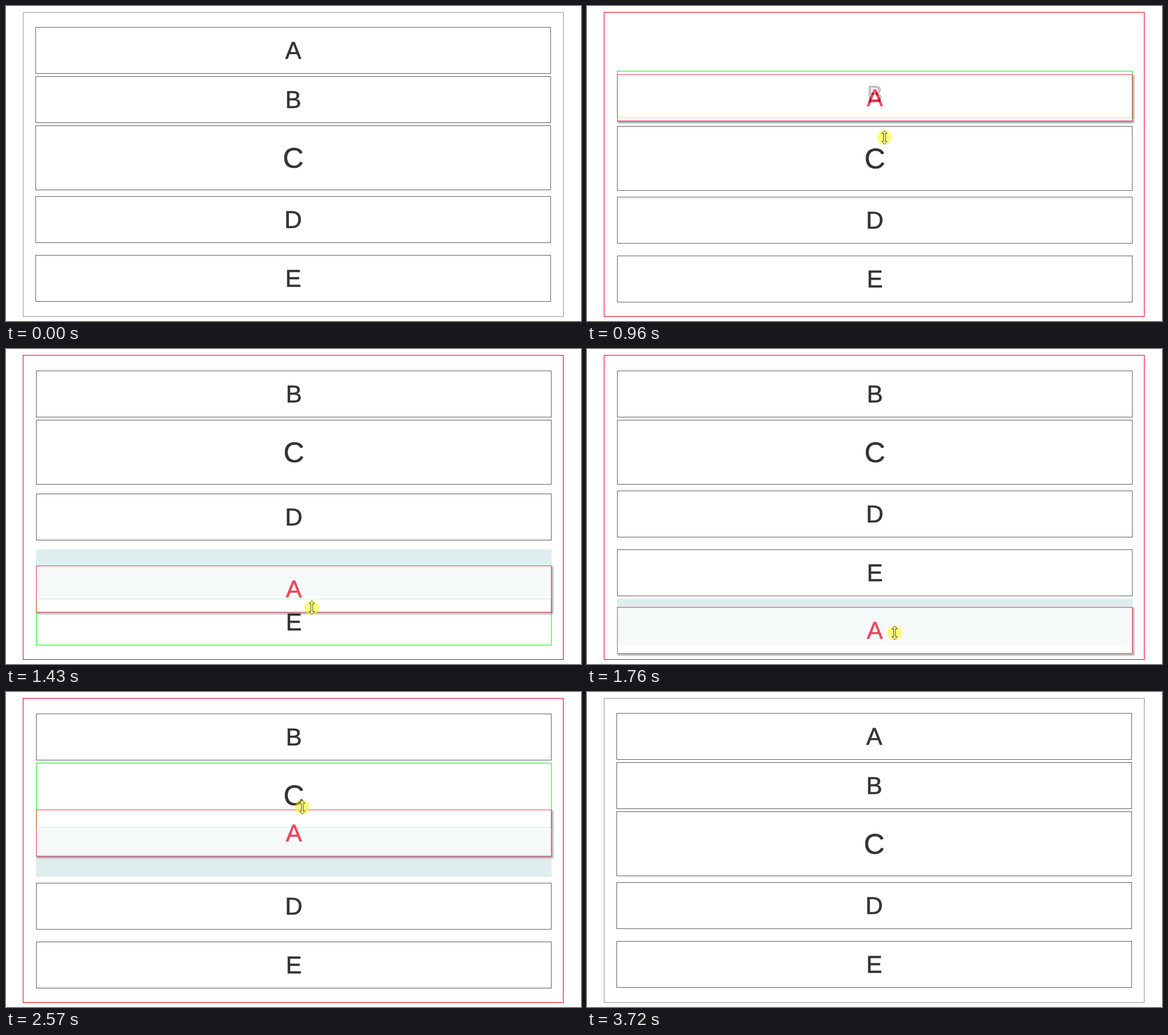
An HTML page for the animation above (4.23 s loop, 957 by 525 pixels).

```html
<!DOCTYPE html>
<html lang="en">
<head>
<meta charset="utf-8">
<title>Drag to reorder</title>
<style>
  html, body { margin: 0; width: 100%; height: 100%; overflow: hidden; background: #fff; }
  #stage { --red: #f0001e; position: relative; width: 957px; height: 525px; overflow: hidden; }
  #stage * { box-sizing: border-box; }
  #frame { position: absolute; left: 28px; top: 10px; width: 900px; height: 508px; border: 1px solid #999; }
  #list, #cursor { position: absolute; left: 0; top: 0; }
  #list { transform: translate(-1px, -1px); }
  .item, #slot { position: absolute; left: 50px; top: 0; width: 858px; height: 78px; }
  .item {
    display: flex; align-items: center; justify-content: center;
    border: 1px solid #666; background: #fff; color: #333;
    font: 40px "Liberation Sans", Arial, sans-serif;
    -webkit-text-stroke: .6px;
  }
  .item.over { border-color: lime; }
  #C { height: 108px; font-size: 48px; }
  #slot { background: #deeeee; visibility: hidden; }
  #cursor { width: 24px; height: 24px; margin: -12px 0 0 -12px; }
  .held #frame { border-color: var(--red); }
  .held #list { transform: none; }
  .held #slot { visibility: visible; }
  .held #A {
    border-color: var(--red); color: var(--red); opacity: .7;
    box-shadow: 2px 2px 2px 1px rgba(0, 0, 0, .42);
  }
</style>
</head>
<body>
<div id="stage">
  <div id="frame"></div>
  <div id="list">
    <div id="slot"></div>
    <div class="item" id="B">B</div>
    <div class="item" id="C">C</div>
    <div class="item" id="D">D</div>
    <div class="item" id="E">E</div>
    <div class="item" id="A">A</div>
  </div>
  <svg id="cursor" viewBox="-12 -12 24 24">
    <circle r="12" fill="#ff0" fill-opacity=".52"/>
    <path d="M0-11.5 4.5-6.5H1.5V6.5H4.5L0 11.5-4.5 6.5H-1.5V-6.5H-4.5Z"
          fill="#ff9" stroke="#443" stroke-width=".9"/>
  </svg>
</div>
<script>
const LOOP = 4230, SHOW = 120, ARRIVE = 620, GRAB = 670, DROP = 3370, HIDE = 3720;
const TOP = 36, SWAP = 220;

// Neighbours move up when passed on the way down, and back when passed again.
const neighbours = [
  { id: 'B', up: 910, down: 2913 },
  { id: 'C', up: 1060, down: 2640, height: 108 },
  { id: 'D', up: 1245, down: 2300, above: 10, below: 20 },
  { id: 'E', up: 1460, down: 2170 }
].map(item => ({ height: 78, above: 4, below: 4, ...item }));
const dragged = { id: 'A', height: 78, above: 4, below: 4 };

// Key moments of the drag: time, top of the dragged box, height of the pointer.
const drag = [
  [GRAB, TOP, 79], [960, 114, 219], [1430, 361, 431], [1760, 430, 473], [1990, 430, 473],
  [2230, 349, 349], [2570, 196, 192], [3040, 69, 103], [3170, 51, 94], [DROP, 51, 94]
];
const boxY = drag.map(([time, box]) => [time, box]);
const pointerY = [[SHOW, 482], [460, 150], [ARRIVE, 79],
  ...drag.map(([time, , pointer]) => [time, pointer]), [HIDE, 540]];
const approachX = [[SHOW, 742], [460, 431], [ARRIVE, 485]];

// Smooth curve through the points that never overshoots them.
function curve(points, time) {
  const slope = i => (points[i + 1][1] - points[i][1]) / (points[i + 1][0] - points[i][0]);
  const tangent = i => {
    if (i === 0 || i === points.length - 1) return 0;
    const a = slope(i - 1), b = slope(i);
    return a * b > 0 ? 2 * a * b / (a + b) : 0;
  };
  const last = points.length - 1;
  if (time <= points[0][0]) return points[0][1];
  if (time >= points[last][0]) return points[last][1];
  const i = points.findIndex(point => point[0] > time) - 1;
  const [t0, v0] = points[i], [t1, v1] = points[i + 1];
  const span = t1 - t0, u = (time - t0) / span;
  return v0 + (v1 - v0) * u * u * (3 - 2 * u)
    + span * u * (1 - u) * ((1 - u) * tangent(i) - u * tangent(i + 1));
}

function ease(u) {
  return (1 - Math.cos(Math.PI * Math.min(1, Math.max(0, u)))) / 2;
}

// Tops of stacked items; touching margins collapse to the larger one.
function stack(order) {
  const tops = {};
  let y = TOP;
  order.forEach((item, i) => {
    if (i) y += Math.max(order[i - 1].below, item.above);
    tops[item.id] = y;
    y += item.height;
  });
  return tops;
}
const low = stack([dragged, ...neighbours]);
const high = stack([...neighbours, dragged]);

const $ = id => document.getElementById(id);
function place(id, x, y) {
  $(id).style.transform = `translate(${Math.round(x)}px, ${Math.round(y)}px)`;
}

function render(time) {
  const held = time >= GRAB && time < DROP;
  const box = held ? curve(boxY, time) : TOP;
  $('stage').classList.toggle('held', held);
  place('A', 0, box);

  let over = null, most = 0;
  for (const { id, up, down, height } of neighbours) {
    const lift = ease((time - up) / SWAP) - ease((time - down) / SWAP);
    const y = low[id] + (high[id] - low[id]) * lift;
    const overlap = Math.min(y + height, box + dragged.height) - Math.max(y, box);
    if (held && overlap > most) [over, most] = [id, overlap];
    place(id, 0, y);
  }
  for (const { id } of neighbours) $(id).classList.toggle('over', id === over);

  const passed = item => time >= item.up && time < item.down;
  const order = [...neighbours.filter(passed), dragged, ...neighbours.filter(n => !passed(n))];
  place('slot', 0, stack(order).A);

  const y = curve(pointerY, time);
  place('cursor', time < ARRIVE ? curve(approachX, time) : 480 + y * 0.068, y);
  $('cursor').style.visibility = time >= SHOW && time < HIDE ? 'visible' : 'hidden';
}

const start = performance.now();
function tick() {
  render((performance.now() - start) % LOOP);
  requestAnimationFrame(tick);
}
render(0);
requestAnimationFrame(tick);
</script>
</body>
</html>
```
